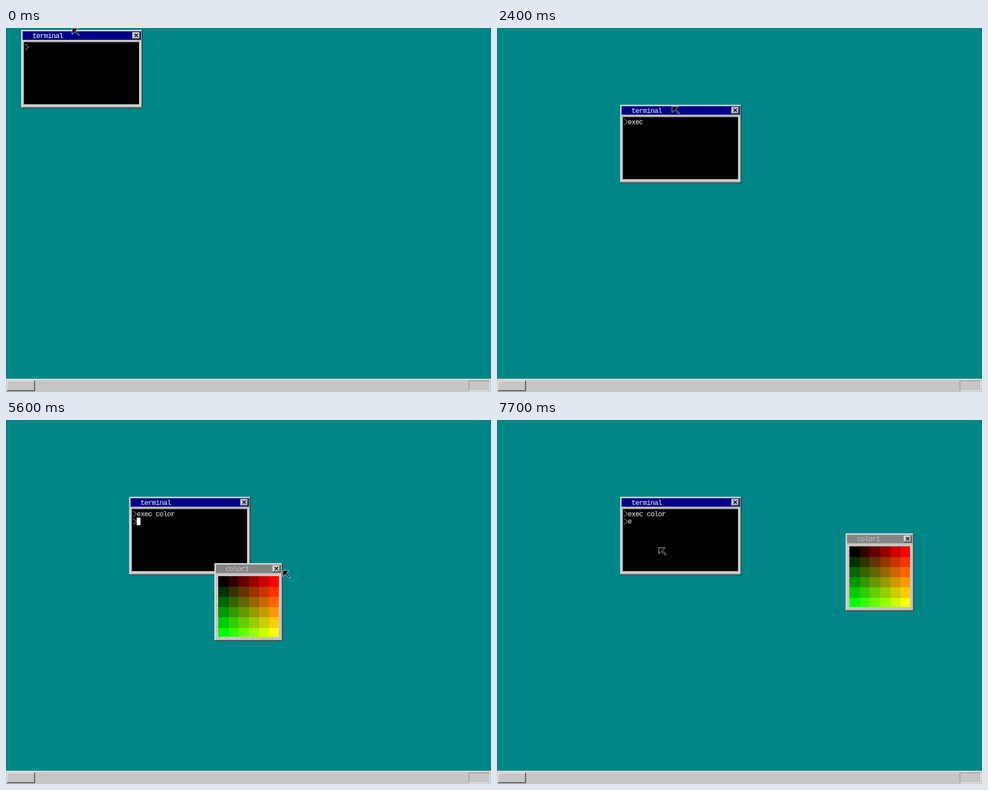
An HTML page that plays this animation: 864x648 px, repeating every 8000 ms.

```html
<!DOCTYPE html>
<html lang="en">
<head>
<meta charset="utf-8">
<title>Desktop</title>
<style>
html, body { margin: 0; width: 100%; height: 100%; overflow: hidden; background: #008686; }
svg { display: block; width: 864px; height: 648px; }
path { fill: none; stroke-width: 1; }
text {
  font: 15px "Liberation Mono", "DejaVu Sans Mono", monospace;
  letter-spacing: -1px;
  white-space: pre;
  fill: #fff;
}
.face { fill: #c6c6c6; }
.light { stroke: #fff; }
.mid { stroke: #848484; }
.faceline { stroke: #c6c6c6; }
.dark { stroke: #000; }
.bar { fill: var(--bar); }
.label { fill: var(--label); }

/* Every change is a hard step; 1.25% is 100 ms. */
#terminal, #palette, #mouse, .focusA, .focusB, #cover, #block, #prompt2, #typed {
  animation: 8s step-end -4ms infinite;
}
#terminal { animation-name: terminal; }
#palette { animation-name: palette; }
#mouse { animation-name: mouse; }
.focusA { animation-name: focusA; }
.focusB { animation-name: focusB; }
#cover { animation-name: typing; }
#block { animation-name: blink; }
#prompt2 { animation-name: prompt2; }
#typed { animation-name: typed; }

@keyframes terminal {
  0% { transform: translate(32px, 4px); }
  5% { transform: translate(64px, 32px); }
  6.25% { transform: translate(128px, 77px); }
  7.5% { transform: translate(188px, 119px); }
  8.75%, 100% { transform: translate(260px, 162px); }
}
@keyframes palette {
  0% { opacity: 0; transform: translate(440px, 302px); }
  55% { opacity: 1; transform: translate(440px, 302px); }
  75% { opacity: 1; transform: translate(460px, 300px); }
  76.25% { opacity: 1; transform: translate(500px, 296px); }
  77.5% { opacity: 1; transform: translate(548px, 290px); }
  78.75% { opacity: 1; transform: translate(604px, 282px); }
  80%, 100% { opacity: 1; transform: translate(736px, 239px); }
}
@keyframes mouse {
  0% { transform: translate(139px, 0); }
  2.5% { transform: translate(141px, 7px); }
  5% { transform: translate(175px, 35px); }
  6.25% { transform: translate(237px, 80px); }
  7.5% { transform: translate(299px, 122px); }
  8.75% { transform: translate(369px, 165px); }
  61.25% { transform: translate(410px, 188px); }
  62.5% { transform: translate(500px, 240px); }
  63.75% { transform: translate(600px, 290px); }
  65% { transform: translate(672px, 318px); }
  66.25% { transform: translate(640px, 322px); }
  67.5% { transform: translate(600px, 322px); }
  70% { transform: translate(584px, 317px); }
  71.25% { transform: translate(561px, 314px); }
  73.75% { transform: translate(566px, 306px); }
  75% { transform: translate(587px, 304px); }
  76.25% { transform: translate(627px, 300px); }
  77.5% { transform: translate(675px, 294px); }
  78.75% { transform: translate(731px, 286px); }
  80% { transform: translate(862px, 243px); }
  81.25% { transform: translate(837px, 249px); }
  83.75% { transform: translate(700px, 255px); }
  85% { transform: translate(500px, 262px); }
  86.25%, 100% { transform: translate(341px, 269px); }
}
@keyframes focusA {
  0%, 88.75%, 100% { --bar: #000084; --label: #fff; }
  73.75% { --bar: #848484; --label: #c6c6c6; }
}
@keyframes focusB {
  0%, 88.75%, 100% { --bar: #848484; --label: #c6c6c6; }
  73.75% { --bar: #000084; --label: #fff; }
}
@keyframes typing {
  0% { transform: translateX(0); }
  21.25% { transform: translateX(8px); }
  25% { transform: translateX(16px); }
  27.5% { transform: translateX(24px); }
  30% { transform: translateX(32px); }
  46.25% { transform: translateX(48px); }
  47.5% { transform: translateX(56px); }
  48.75% { transform: translateX(64px); }
  50% { transform: translateX(72px); }
  51.25%, 100% { transform: translateX(80px); }
}
@keyframes blink {
  0%, 11.25%, 21.25% { opacity: 0; transform: translate(0, 0); }
  5%, 17.5% { opacity: 1; transform: translate(0, 0); }
  42.5% { opacity: 1; transform: translate(40px, 0); }
  46.25%, 61.25%, 73.75%, 96.25%, 100% { opacity: 0; transform: translate(0, 16px); }
  55%, 67.5%, 93.75% { opacity: 1; transform: translate(0, 16px); }
}
@keyframes prompt2 {
  0% { opacity: 0; }
  53.75%, 100% { opacity: 1; }
}
@keyframes typed {
  0% { opacity: 0; }
  96.25%, 100% { opacity: 1; }
}
</style>
</head>
<body>
<svg viewBox="0 0 1024 768">
  <defs>
    <linearGradient id="red"></linearGradient>
    <linearGradient id="green" x2="0" y2="1"></linearGradient>
    <g id="close">
      <rect class="face" width="16" height="14"/>
      <path class="light" d="M0 .5H15M.5 1V13"/>
      <path class="mid" d="M1 12.5H15M14.5 1V12"/>
      <path class="dark" d="M0 13.5H16M15.5 0V13"/>
      <path class="dark" d="M4.5 3L11.5 10M11.5 3L4.5 10" style="stroke-width:1.7"/>
    </g>
    <path id="prompt" class="light" d="M.5 1.5L7.5 8L.5 14.5"/>
  </defs>

  <rect width="1024" height="768" fill="#008686"/>
  <rect class="face" y="740" width="1024" height="28"/>
  <path class="light" d="M0 741.5H1024M3 744.5H60M2.5 744V765M977 765.5H1021M1021.5 744V766"/>
  <path class="mid" d="M3 764.5H60M59.5 745V764M977 744.5H1021M977.5 745V765"/>
  <path class="dark" d="M2 765.5H60M60.5 744V766"/>

  <g id="terminal">
    <g class="focusA">
      <rect class="face" width="256" height="165"/>
      <path class="light" d="M1 1.5H254M1.5 2V163"/>
      <path class="mid" d="M254.5 1V163M1 163.5H255"/>
      <path class="dark" d="M255.5 0V165M0 164.5H255"/>
      <rect class="bar" x="3" y="3" width="250" height="18"/>
      <text class="label" x="24" y="17">terminal</text>
      <use href="#close" x="235" y="5"/>
    </g>
    <path class="mid" d="M5 25.5H250M5.5 26V158"/>
    <path class="light" d="M5 158.5H250M250.5 25V159"/>
    <rect x="6" y="26" width="243" height="131"/>
    <use href="#prompt" x="8" y="28"/>
    <text x="16" y="41">exec color</text>
    <rect id="cover" x="16" y="28" width="84" height="16"/>
    <use id="prompt2" href="#prompt" x="8" y="44"/>
    <text id="typed" x="16" y="57">e</text>
    <rect id="block" x="16" y="28" width="8" height="16" fill="#fff"/>
  </g>

  <g id="palette">
    <g class="focusB">
      <rect class="face" width="144" height="164"/>
      <path class="light" d="M1 1.5H142M1.5 2V162"/>
      <path class="mid" d="M142.5 1V162M1 162.5H143"/>
      <path class="dark" d="M143.5 0V164M0 163.5H143"/>
      <rect class="bar" x="3" y="3" width="138" height="18"/>
      <text class="label" x="24" y="17">color1</text>
      <use href="#close" x="123" y="5"/>
    </g>
    <g id="swatches" shape-rendering="crispEdges"></g>
  </g>

  <path id="mouse" class="light" style="fill:#000" d="M.5 .5H13.5L8.5 5.5V6.5L15.5 13.5V15.5H13.5L6.5 8.5H5.5L.5 13.5Z"/>
</svg>
<script>
// Six levels of red across and six of green down.
const edge = i => Math.min(128, Math.ceil(i * 21.5));
const swatches = document.getElementById('swatches');
document.querySelectorAll('linearGradient').forEach(g => g.remove());
for (let row = 0; row < 6; row++) {
  for (let col = 0; col < 6; col++) {
    const cell = document.createElementNS(swatches.namespaceURI, 'rect');
    const attrs = {
      x: 8 + edge(col), y: 28 + edge(row),
      width: edge(col + 1) - edge(col), height: edge(row + 1) - edge(row),
      fill: `rgb(${col * 51},${row * 51},0)`
    };
    for (const name in attrs) cell.setAttribute(name, attrs[name]);
    swatches.append(cell);
  }
}
</script>
</body>
</html>
```
